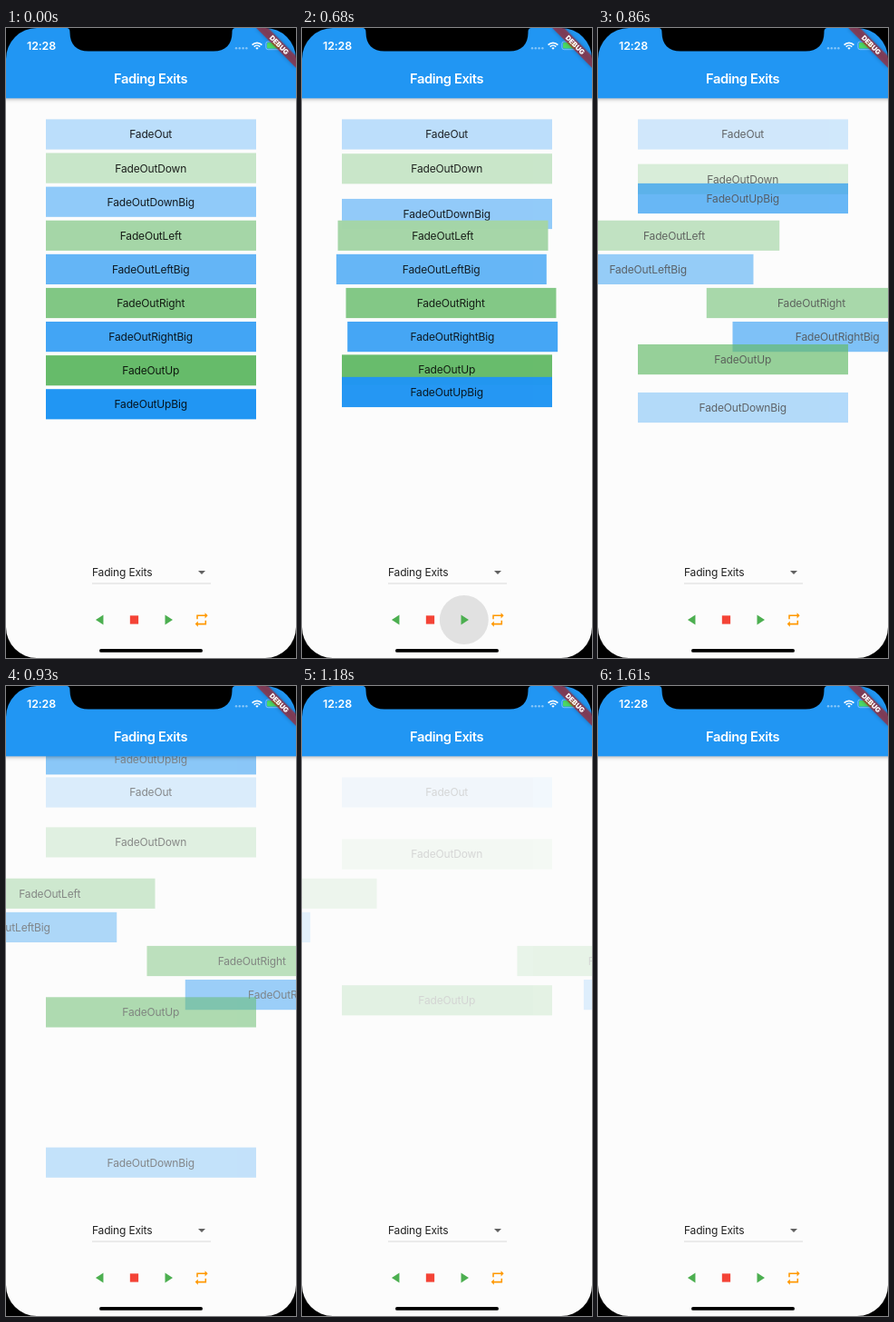
These frames come from a looping animation (320x693 px, 1670 ms). An HTML page:

```html
<!DOCTYPE html>
<html lang="en">
<head>
<meta charset="utf-8">
<title>Fading Exits</title>
<style>
  html, body { margin: 0; width: 100%; height: 100%; overflow: hidden; background: #fcfcfc; }
  svg { display: block; width: 320px; height: 693px; font: 12px Inter, sans-serif; letter-spacing: -.17px; }
  .mid { text-anchor: middle; }
  .title { font-size: 14.7px; font-weight: 600; letter-spacing: -.4px; }
  .clock { font-size: 12.4px; font-weight: 600; letter-spacing: -.1px; }
  .debug { font-size: 7.6px; font-weight: 900; letter-spacing: 0; }
  .bar { filter: drop-shadow(0 1.5px 2px rgba(0, 0, 0, .3)); }
  .banner { filter: drop-shadow(0 0 2px rgba(0, 0, 0, .4)); }
</style>
</head>
<body>
<svg viewBox="0 0 320 693">
  <rect width="320" height="693" fill="#fcfcfc"/>
  <g id="list" fill-opacity="1"></g>

  <!-- app bar -->
  <rect class="bar" x="-10" y="-10" width="340" height="87.3" fill="#2196f3"/>
  <text class="mid title" x="159.6" y="61.3" fill="#fff">Fading Exits</text>

  <!-- status bar -->
  <g fill="#fff">
    <text class="clock" x="23" y="24">12:28</text>
    <g opacity=".45">
      <circle cx="254" cy="22.3" r="1.2"/><circle cx="257.8" cy="22.3" r="1.2"/>
      <circle cx="261.6" cy="22.3" r="1.2"/><circle cx="265.4" cy="22.3" r="1.2"/>
    </g>
    <g transform="translate(277 23.8)">
      <path d="M0 0L-1.7-1.7A2.4 2.4 0 0 1 1.7-1.7z"/>
      <path d="M-5.4-5.2A7.6 7.6 0 0 1 5.4-5.2M-3.3-3.2A4.7 4.7 0 0 1 3.3-3.2" fill="none" stroke="#fff" stroke-width="1.7"/>
    </g>
    <rect x="286.8" y="14.9" width="17" height="8.8" rx="2.4" fill="none" stroke="#fff" stroke-opacity=".5" stroke-width=".8"/>
    <rect x="288" y="16.1" width="14.6" height="6.4" rx="1.3" fill="#4cd964"/>
  </g>

  <!-- debug banner -->
  <g transform="translate(320 0) rotate(45)">
    <rect class="banner" x="-31" y="21.65" width="62" height="9.3" fill="#b71c1c" fill-opacity=".63"/>
    <text class="mid debug" x="0" y="29" fill="#fff">DEBUG</text>
  </g>

  <!-- dropdown -->
  <g>
    <text x="95" y="603.2" fill="#212121">Fading Exits</text>
    <path d="M212 597h8l-4 4z" fill="#616161"/>
    <path d="M95 611h131" stroke="#d4d4d4" stroke-width=".9"/>
  </g>

  <!-- controls -->
  <circle id="ripple" cx="178.8" cy="651" r="27"/>
  <g id="controls"></g>

  <!-- phone outline -->
  <path fill-rule="evenodd" d="M0 0H320V693H0zM34 0A34 34 0 0 0 0 34V659A34 34 0 0 0 34 693H286A34 34 0 0 0 320 659V34A34 34 0 0 0 286 0z"/>
  <path d="M66 0C70 0 70.5 2 70.5 5C70.5 18 78 25.5 91 25.5H229C242 25.5 249.5 18 249.5 5C249.5 2 250 0 254 0z"/>
  <rect x="103" y="683" width="114" height="3.8" rx="1.9"/>
</svg>
<script>
const LOOP = 1670, EXIT_START = 646.3, EXIT_TIME = 1000;
// The picture is held between these moments, like a screen recording.
const TICKS = [0, 560, 620, 680, 750, 796, 860, 930, 1000, 1050, 1110, 1180, 1240, 1300, 1360, 1430, 1490, 1550, 1610];
const W = 232, H = 33.2, PITCH = 37.1, STAGE_W = 320, STAGE_H = 693;

// label suffix, colour, travel in x, travel in y
const exits = [
  ['', '#bbdefb', 0, 0],
  ['Down', '#c8e6c9', 0, PITCH],
  ['DownBig', '#90caf9', 0, STAGE_H],
  ['Left', '#a5d6a7', -W, 0],
  ['LeftBig', '#64b5f6', -STAGE_W, 0],
  ['Right', '#81c784', W, 0],
  ['RightBig', '#42a5f5', STAGE_W, 0],
  ['Up', '#66bb6a', 0, -PITCH],
  ['UpBig', '#2196f3', 0, -STAGE_H],
];
const list = document.getElementById('list');
const ripple = document.getElementById('ripple');

list.innerHTML = exits.map(([name, color], i) => {
  const y = 100.4 + i * PITCH;
  return `<g><rect x="44" y="${y}" width="${W}" height="${H}" fill="${color}"/>
    <text class="mid" x="159.7" y="${y + 21}" fill="#000" fill-opacity=".87">FadeOut${name}</text></g>`;
}).join('');

document.getElementById('controls').innerHTML = [
  ['#4caf50', 'M16 5v14L5 12z'],
  ['#f44336', 'M6 6h12v12H6z'],
  ['#4caf50', 'M8 5v14l11-7z'],
  ['#ff9800', 'M7 7h10v3l4-4-4-4v3H5v6h2V7zm10 10H7v-3l-4 4 4 4v-3h12v-6h-2v4z'],
].map(([color, d], i) =>
  `<path fill="${color}" d="${d}" transform="translate(${95.1 + i * PITCH} 641.7) scale(.773)"/>`).join('');

// cubic-bezier(.25, .1, .25, 1)
function ease(x) {
  const bezier = (a, b, s) => 3 * a * s * (1 - s) ** 2 + 3 * b * s * s * (1 - s) + s ** 3;
  let lo = 0, hi = 1;
  for (let i = 0; i < 30; i++) {
    const mid = (lo + hi) / 2;
    if (bezier(.25, .25, mid) < x) lo = mid; else hi = mid;
  }
  return bezier(.1, 1, lo);
}

function draw(now) {
  const loopTime = now % LOOP;
  const t = TICKS.filter(tick => tick <= loopTime).pop();
  const p = ease(Math.min(1, Math.max(0, (t - EXIT_START) / EXIT_TIME)));
  exits.forEach(([, , dx, dy], i) => {
    const item = list.children[i];
    item.setAttribute('transform', `translate(${dx * p} ${dy * p})`);
    item.setAttribute('opacity', 1 - p);
  });
  ripple.setAttribute('opacity', .105 * Math.max(0, 1 - Math.abs(t - 680) / 143));
}

const start = performance.now();
function frame() {
  draw(performance.now() - start);
  requestAnimationFrame(frame);
}
frame();
</script>
</body>
</html>
```
